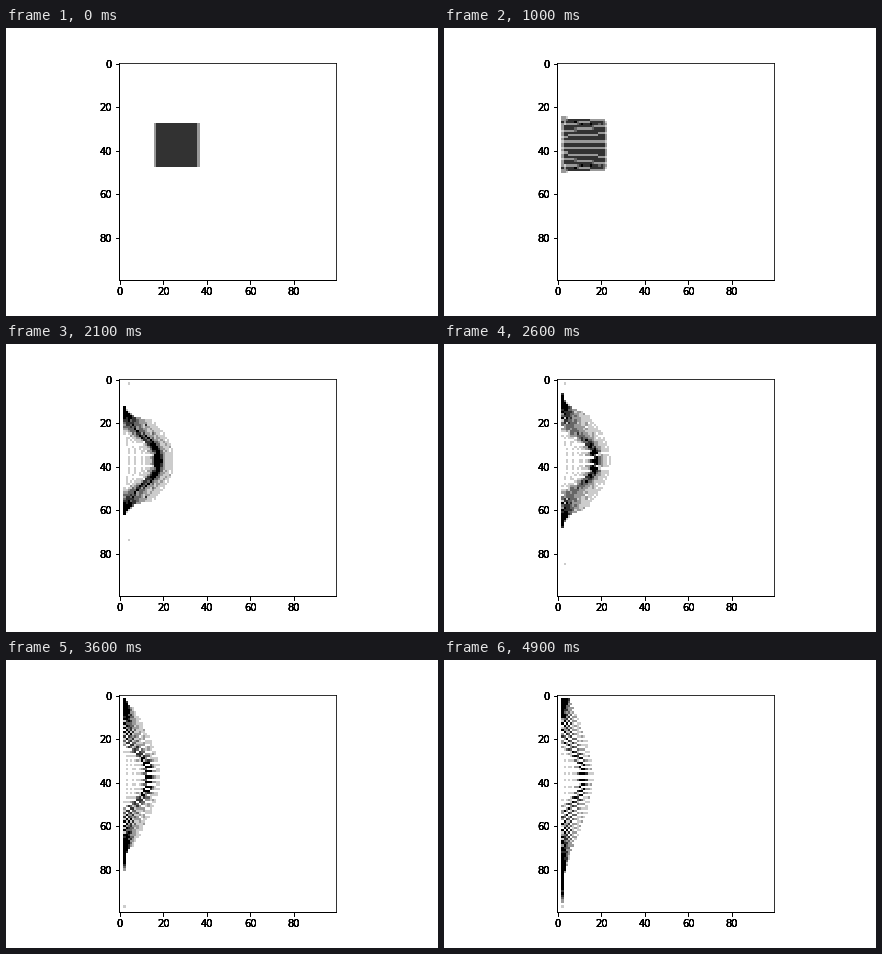
Animation of 432x288 px, one loop 5000 ms. Source, as a matplotlib script:

```python
import numpy as np
import matplotlib.pyplot as plt
from matplotlib.animation import FuncAnimation

plt.rcParams.update({"font.family": "DejaVu Sans", "font.size": 10})

CELLS = 100
SIDE = 40          # particles along each side of the block
WALL = 2.05
MIDDLE = 38        # height at which the block hits the wall
SPEED = 1.47       # cells per frame before the impact
FRAMES = 50

# Material coordinates: depth 0 (leading) to 1 (trailing), span -1 to 1
steps = (np.arange(SIDE) + 0.5) / SIDE
depth, span = np.meshgrid(steps, 2 * steps - 1)


def ramp(t, start, length):
    return min(max((t - start) / length, 0), 1)


def back_edge(t):
    """Free flight, then a short rebound and a slow collapse."""
    collapse = 1 / (1 + np.exp((t - 33) / 3.2))
    rebound = 16.5 + 9.5 * collapse - 3.2 * np.exp(-(t - 10) / 3)
    return max(36.5 - SPEED * t, rebound)


def layers(t, rise):
    """Share of the thickness reached by each depth."""
    z = 2 * depth - 1
    ridge = 0.66 + 0.12 * z + 0.38 * z**7 - 0.16 * z**8
    legs = 0.6 * depth + 0.4 * depth**6
    near_middle = np.exp(-(rise / 12) ** 4)
    spread = near_middle * ridge + (1 - near_middle) * legs
    opened = ramp(t, 9.5, 7.5)
    return (1 - opened) * depth + opened * spread


def particles(t):
    front = max(WALL, 16.5 - SPEED * t)
    reach = 10 + 1.2 * max(t - 8, 0)
    lag = 0.28 * ramp(t, 8, 9)
    taper = 0.075 * max(t - 9.7, 0)

    rise = span * reach * (1 - lag * depth)
    bell = (1 - 0.98 * (rise / reach) ** 2) ** taper
    x = front + (back_edge(t) - front) * layers(t, rise) * bell
    y = MIDDLE + rise

    # The jet turns round at the top and stops at the bottom
    over = np.maximum(2.2 - y, 0)
    x = x + 0.05 * over
    y = np.where(over > 0, 2.2 + 0.4 * over, np.minimum(y, 97.5))
    return x.ravel(), y.ravel()


def spray(t):
    """Two stray drops that run ahead of the jets."""
    if t < 13:
        return [], []
    run = 27 + 2.33 * (t - 17)
    x = max(2.5, 4.6 - 0.13 * (t - 17))
    return [x, x], [max(MIDDLE - run, 2.5), min(MIDDLE + run, 97.5)]


def density(t):
    x, y = (np.concatenate(pair) for pair in zip(particles(t), spray(t)))
    edges = np.arange(CELLS + 1)
    return np.histogram2d(y, x, bins=(edges, edges))[0]


fig = plt.figure(figsize=(6, 4), dpi=72, facecolor="white")
box = [0.26083, 0.125, 0.50333, 0.755]
ax = fig.add_axes(box)
image = ax.imshow(density(0), cmap="gray_r", vmin=0, vmax=5,
                  interpolation="nearest", aspect="auto")
ax.set(xticks=[], yticks=[])

# Stacked axes give the heavy, overprinted labels
for i in range(6):
    overprint = fig.add_axes(box, facecolor="none", label=f"overprint {i}")
    overprint.set(xlim=(-0.5, 99.5), ylim=(99.5, -0.5),
                  xticks=range(0, 100, 20), yticks=range(0, 100, 20))
    overprint.spines[["top", "right"]].set_visible(False)


def update(frame):
    image.set_data(density(frame))
    return [image]


anim = FuncAnimation(fig, update, frames=FRAMES, interval=100,
                     repeat=True, repeat_delay=0, blit=False)
plt.show()
```
